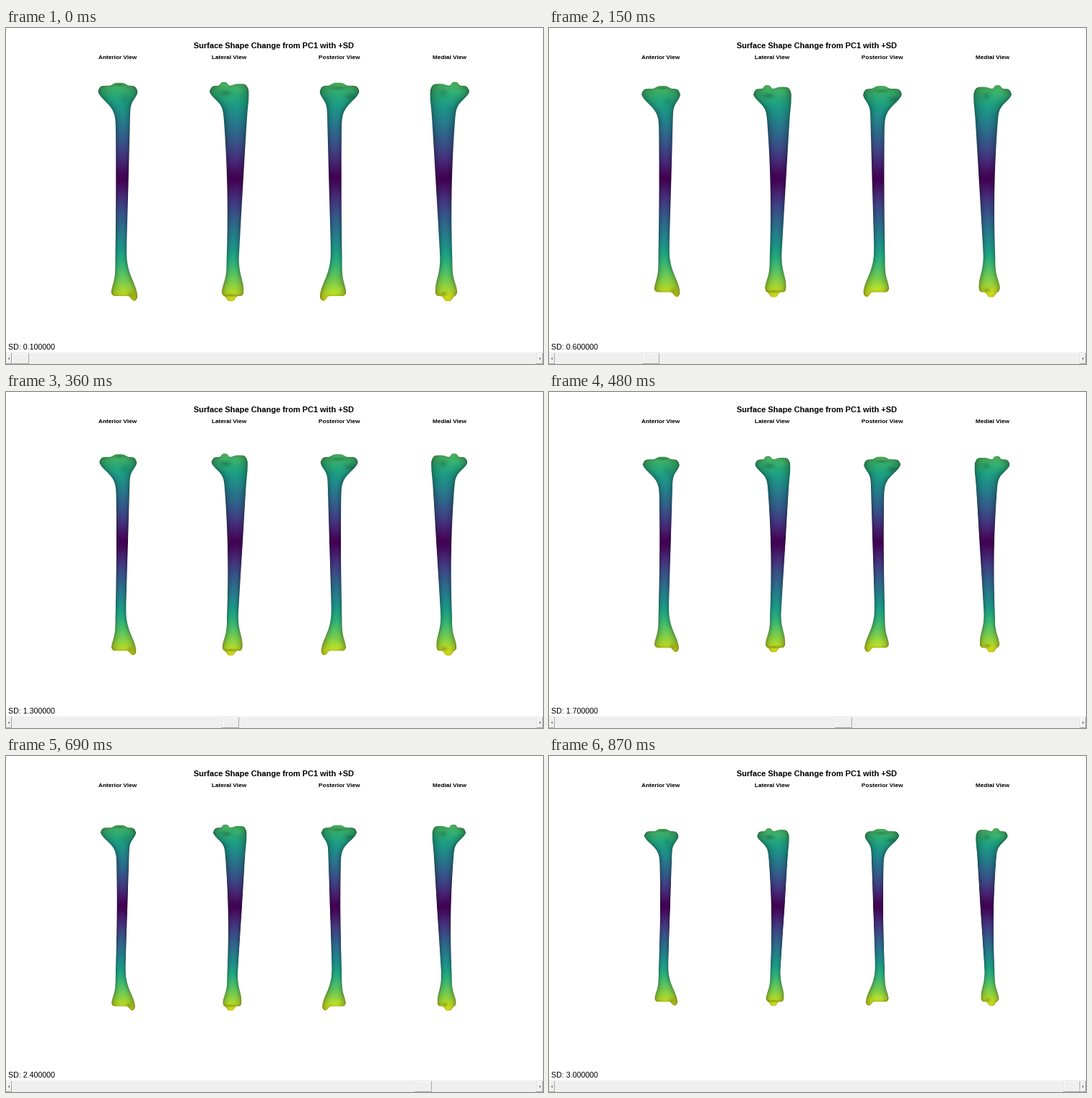
These frames come from a looping animation (744x465 px, 0.9 s). A matplotlib script:

```python
import numpy as np
import matplotlib.pyplot as plt
from matplotlib.animation import FuncAnimation

W, H, DPI = 744, 465, 96
FRAMES, INTERVAL = 30, 30
MID_Y = 208                  # level that stays fixed while the bone shortens
Y_SHRINK = 0.19
HEAD_Y, FOOT_Y = 87, 369     # widest levels of both ends
viridis = plt.get_cmap("viridis")


def bell(d, power=2):
    return np.exp(-np.abs(d) ** power)


class Edge:
    """One side of the bone: a bowed shaft that flares out at both ends."""

    def __init__(self, shaft, top, bottom):
        self.curve = np.polyfit((110, 205, 310), shaft, 2)
        self.top, self.bottom = top, bottom

    def __call__(self, y):
        x = np.polyval(self.curve, np.clip(y, 100, 320))
        reach, start, length = self.top
        x = x + reach * bell(np.maximum(y - start, 0) / length)
        reach, start, length = self.bottom
        return x + reach * bell(np.maximum(start - y, 0) / length)


class Profile:
    """Silhouette at rest, and how it narrows; the rear view mirrors it."""

    def __init__(self, left, right, ridges, tips, center, narrow, waist, drift):
        self.left, self.right = left, right
        self.ridges, self.tips = ridges, tips
        self.center, self.narrow = center, narrow
        self.waist, self.drift = waist, drift

    def corner(self, x, y):
        a, b = self.left(y), self.right(y)
        u = (2 * x - a - b) / (b - a)
        return np.minimum(np.abs(u), 1.2) ** 12

    def top(self, x):
        y = 79.8 + 8 * self.corner(x, HEAD_Y)
        return y - sum(h * bell((x - c) / w, 4) for c, w, h in self.ridges)

    def bottom(self, x):
        y = 371 - 5 * self.corner(x, FOOT_Y)
        return y + sum(h * bell((x - c) / w, 4) for c, w, h in self.tips)

    def to_rest(self, x, y, amount):
        ry = MID_Y + (y - MID_Y) / (1 - Y_SHRINK * amount)
        scale = 1 - amount * (self.narrow + self.waist * bell((ry - 220) / 100))
        bend = amount * self.drift * np.maximum(0, (ry - MID_Y) / 170)
        return self.center + (x - self.center - bend) / scale, ry


FRONT = Profile(
    left=Edge((151.8, 152.3, 151.6), (-24.3, 86, 21), (-5.6, 367, 17)),
    right=Edge((172.2, 169.8, 166.8), (9.8, 88, 13), (15.6, 373, 32)),
    ridges=[(157, 10, 4)], tips=[(180, 7.5, 6.8)],
    center=161, narrow=.12, waist=.09, drift=-1.5)

SIDE = Profile(
    left=Edge((300.5, 306, 306), (-17.5, 87, 15), (-6.6, 366, 18)),
    right=Edge((334.7, 329, 323), (1, 90, 20), (6.6, 362, 22)),
    ridges=[(302, 5.5, 5), (325, 11, 2.5)], tips=[(311.5, 6.8, 7)],
    center=316, narrow=.185, waist=0, drift=-1.4)

# Profile, mirror sum (None: not mirrored), and hollows or bulges given as
# x, y, x radius, y radius, change of brightness
VIEWS = [
    (FRONT, None, [(157, 79, 8, 2, -.2), (164, 98, 6, 6, -.08),
                   (173, 370, 4, 5, -.15)]),
    (SIDE, None, [(304, 90, 8, 4, -.2), (322, 87, 9, 5, .06),
                  (312, 370, 9, 1.8, -.25)]),
    (FRONT, 617, [(156, 83, 10, 2.5, -.2), (140, 95, 8, 4, -.15),
                  (161, 364, 10, 6, .06)]),
    (SIDE, 924, [(318, 90, 5, 5, -.14), (299, 88, 8, 4, .06),
                 (317, 368, 4, 3, -.2)]),
]


def paint_bone(img, profile, mirror, spots, amount):
    center = profile.center if mirror is None else mirror - profile.center
    x0, x1, y0, y1 = center - 45, center + 45, 70, 385
    sx, sy = np.arange(x0, x1) + .5, np.arange(y0, y1) + .5
    if mirror is not None:
        sx = mirror - sx
    x, y = profile.to_rest(sx[None, :], sy[:, None], amount)

    left, right = profile.left(y), profile.right(y)
    side = np.minimum(x - left, right - x)
    end = np.minimum(y - profile.top(x), profile.bottom(x) - y)
    cover = np.clip(side + .5, 0, 1) * np.clip(end + .5, 0, 1)

    # Colour shows how far each point travels
    reach = np.hypot(y - MID_Y, .55 * (x - profile.center))
    color = viridis(np.clip(.0058 * (np.hypot(reach, 6) - 4.5), 0, .97))[..., :3]

    # Light from the camera: dark towards the silhouette
    u = np.clip((2 * x - left - right) / (right - left), -1, 1)
    shade = .56 + .42 * np.sqrt(1 - u**2)
    shade -= .15 * bell(np.maximum(end, 0) / 2, 1)
    shade -= .06 * bell((y - 80) / 14)
    for cx, cy, w, h, gain in spots:
        shade += gain * bell((x - cx) / w) * bell((y - cy) / h)

    color = color * np.clip(shade, .3, 1)[..., None]
    alpha = cover[..., None]
    part = img[y0:y1, x0:x1]
    part[:] = part * (1 - alpha) + color * alpha


def raised_box(img, x0, x1, y0=449, y1=H):
    img[y0:y1, x0:x1] = .941
    img[y0:y1, x0] = img[y0, x0:x1] = .89
    img[y0 + 1:y1 - 1, x0 + 1] = img[y0 + 1, x0 + 1:x1 - 1] = 1
    img[y0 + 1:y1, x1 - 1] = img[y1 - 1, x0:x1] = .66


def paint_slider(img, progress):
    img[449:] = .938
    raised_box(img, 0, 8)
    raised_box(img, 735, W)
    for k in range(2):
        img[457 - k:458 + k, 3 + k] = .45
        img[457 - k:458 + k, 740 - k] = .45
    x = 8 + round(704 * progress)
    raised_box(img, x, x + 24)


fig = plt.figure(figsize=(W / DPI, H / DPI), dpi=DPI, facecolor="white")
ax = fig.add_axes([0, 0, 1, 1])
ax.set_axis_off()
picture = ax.imshow(np.ones((H, W, 3)), extent=(0, W, H, 0),
                    interpolation="nearest", aspect="auto")


def label(x, y, text, px, **kw):
    return ax.text(x, y, text, fontsize=px * 72 / DPI, color="black",
                   family="Liberation Sans", va="baseline", **kw)


label(371.5, 28, "Surface Shape Change from PC1 with +SD", 11,
      weight="bold", ha="center")
for x, name in [(154.5, "Anterior"), (309, "Lateral"),
                (461.5, "Posterior"), (614.5, "Medial")]:
    label(x, 43, name + " View", 8.2, weight="bold", ha="center")
readout = label(3, 445, "", 10.67, ha="left")


def draw(i):
    progress = i / (FRAMES - 1)
    img = np.ones((H, W, 3))
    for profile, mirror, spots in VIEWS:
        paint_bone(img, profile, mirror, spots, progress)
    paint_slider(img, progress)
    picture.set_data(img)
    readout.set_text(f"SD: {(i + 1) / 10:.6f}")
    return picture, readout


anim = FuncAnimation(fig, draw, frames=FRAMES, interval=INTERVAL,
                     init_func=lambda: draw(0), repeat=True, repeat_delay=0)
plt.show()
```
